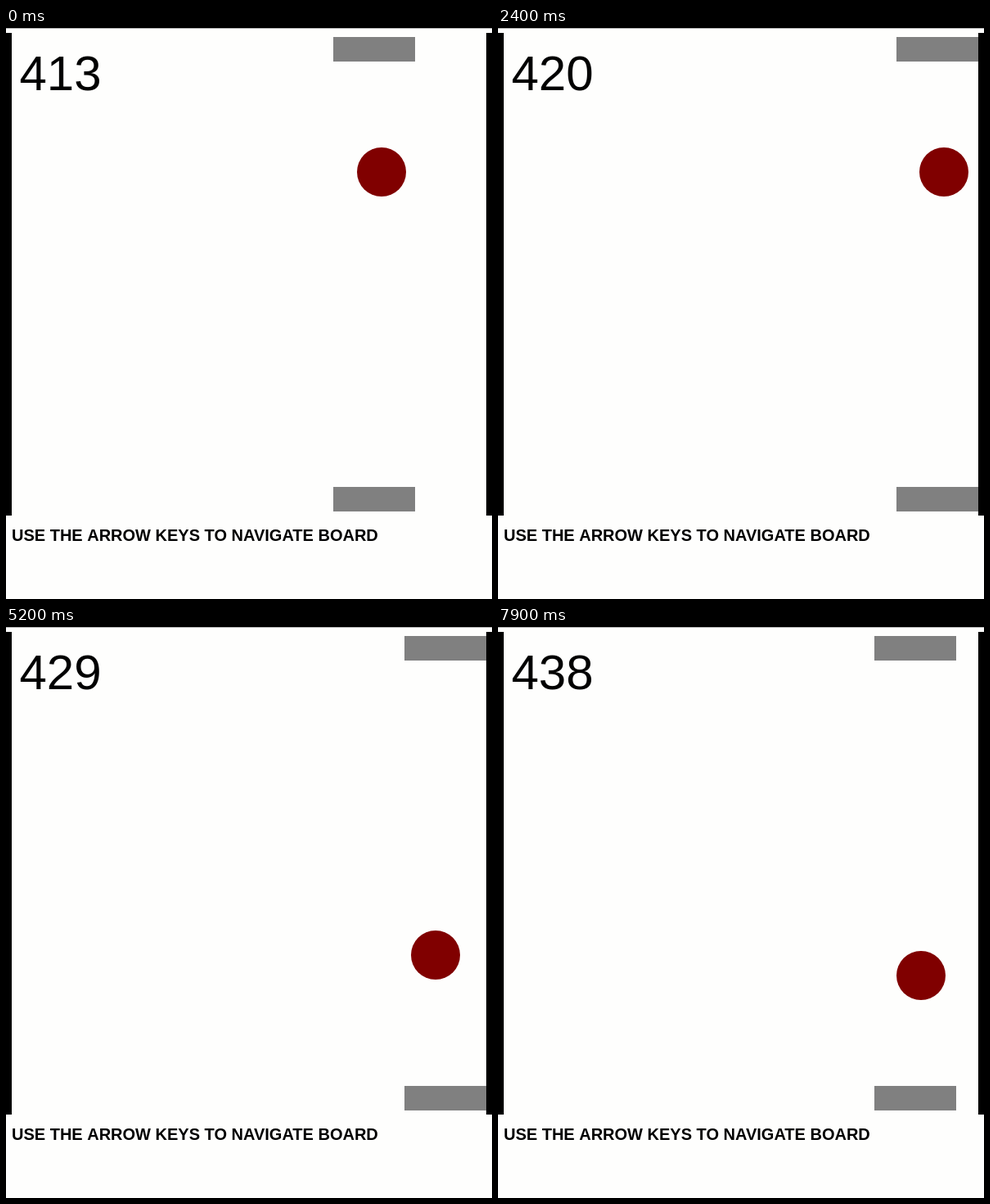
Write an HTML page with a canvas that moves like this. It is 594 by 698 pixels and loops after 8 s.

```html
<!DOCTYPE html>
<html lang="en">
<head>
<meta charset="utf-8">
<style>
  html, body { margin: 0; width: 100%; height: 100%; overflow: hidden; background: #fefefd; }
  canvas { display: block; }
</style>
</head>
<body>
<canvas id="stage" width="594" height="698"></canvas>
<script>
const ctx = document.getElementById('stage').getContext('2d');
const LOOP = 8000, TICK = 100;
const LEG = 19, STEP = 25; // game steps between two paddles, pixels per step
const LAG = 55;            // ms by which the paddles trail the ball

// Sideways turning points of the ball: [ms, x]
const turns = [
  [0, 459], [600, 557], [1400, 496], [2650, 557], [3150, 344], [3600, 515],
  [4152, 348], [5050, 557], [5350, 493], [5850, 540], [7150, 422], [7900, 517]
];

function ballX(t) {
  const i = Math.max(1, turns.findIndex(p => p[0] >= t));
  const [t0, x0] = turns[i - 1], [t1, x1] = turns[i];
  return x0 + (x1 - x0) * (t - t0) / (t1 - t0);
}

// Six game steps per tick, with a slight drift of the game clock
function gameSteps(t) {
  const u = t / LOOP;
  return Math.round(6 * t / TICK + 0.6 * u - 0.8 * Math.sin(2 * Math.PI * u));
}

function rect(color, x, y, w, h) {
  ctx.fillStyle = color;
  ctx.fillRect(x, y, w, h);
}

function label(text, font, x, y) {
  ctx.fillStyle = '#000';
  ctx.font = font + ' "Liberation Sans", Arial, sans-serif';
  ctx.fillText(text, x, y);
}

function draw(t) {
  const phase = gameSteps(t) + 4.5;
  const hits = Math.floor(phase / LEG);
  const along = phase % LEG;
  const y = 1 + STEP * (2.5 + (hits % 2 ? LEG - along : along));
  const paddleX = Math.min(487, Math.round(ballX(t - LAG) - 50));

  rect('#fefefd', 0, 0, 594, 698);
  rect('#b4b4b4', 0, 0, 594, 1);
  for (const top of [11, 561]) rect('#808080', paddleX, top, 100, 30);

  ctx.fillStyle = '#800000';
  ctx.beginPath();
  ctx.arc(Math.round(ballX(t)), y, 30, 0, 2 * Math.PI);
  ctx.fill();

  for (const x of [0, 587]) rect('#000', x, 6, 7, 590);
  label(413 + hits, '60px', 16.5, 76);
  label('USE THE ARROW KEYS TO NAVIGATE BOARD', 'bold 20px', 7, 627);
}

function frame() {
  const t = performance.now() % LOOP;
  draw(Math.floor(t / TICK) * TICK);
  requestAnimationFrame(frame);
}
frame();
</script>
</body>
</html>
```
